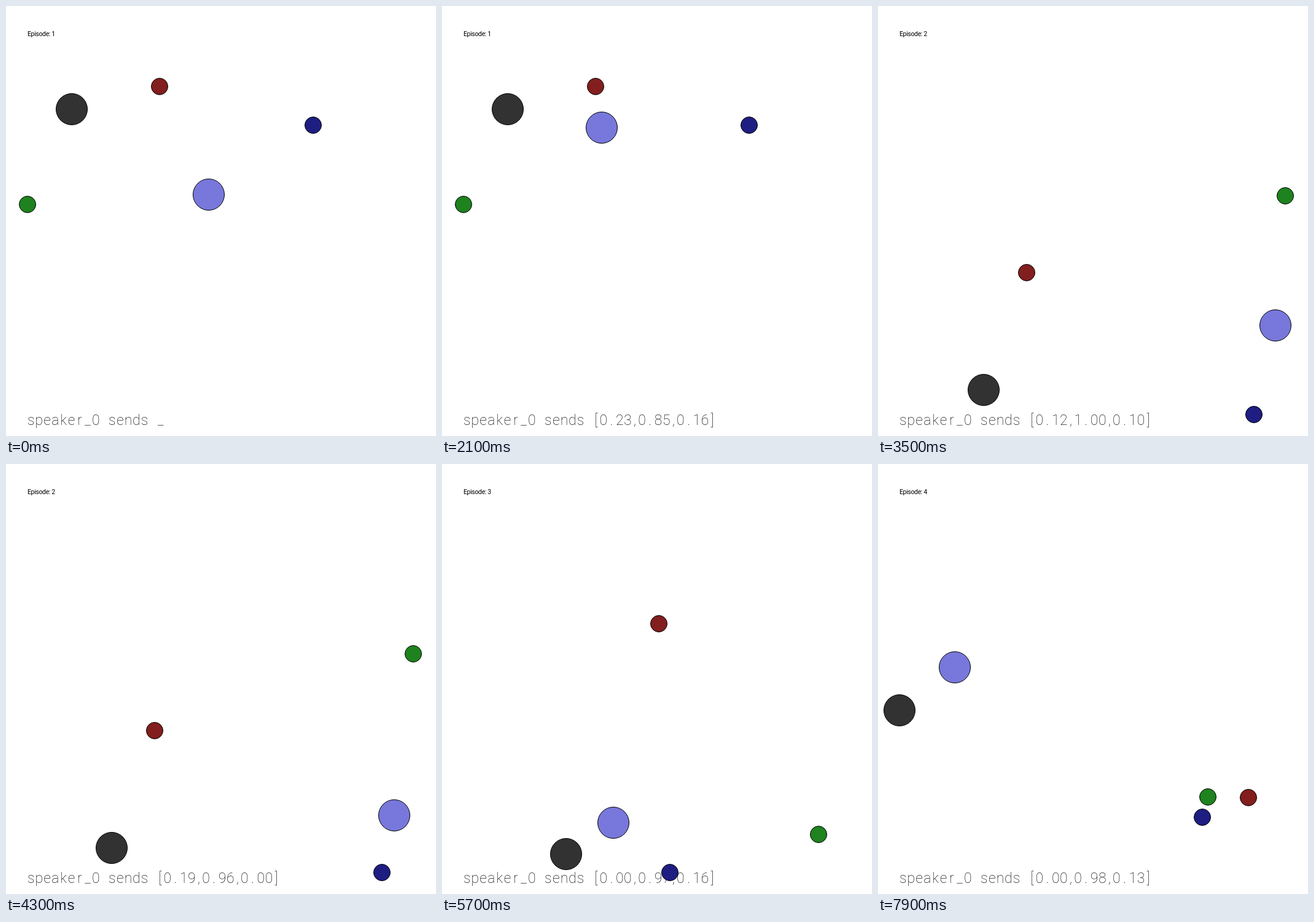
Recreate the animation shown at these times as an HTML page with a canvas. Size 700 by 700 pixels, loop 8 s.

```html
<!DOCTYPE html>
<html lang="en">
<head>
<meta charset="utf-8">
<title>Speaker and listener</title>
<style>
  html, body { margin: 0; width: 100%; height: 100%; overflow: hidden; background: #fff; }
  canvas { display: block; width: 700px; height: 700px; }
</style>
</head>
<body>
<canvas id="stage" width="700" height="700"></canvas>
<script>
const ctx = document.getElementById('stage').getContext('2d');
const LOOP = 8000, TICK = 100, STEPS = 25, TALK_SPAN = 12;
const LANDMARKS = ['rgb(130,30,30)', 'rgb(30,130,30)', 'rgb(30,30,130)'];

// The listener leaves the first point of its path, passes the second at step `via`
// and rests at the third. The speaker's messages vary around `talk`.
const episodes = [
  { speaker: [107, 168], spots: [[250, 131], [35, 323], [500, 194]],
    path: [[330, 307], [250, 203], [261, 198]], via: 9, talk: [[0, .9, .21], [.23, .85, .16]] },
  { speaker: [172, 625], spots: [[242, 434], [663, 309], [612, 665]],
    path: [[510, 151], [647, 520], [622, 585]], via: 10, talk: [[.12, 1, .1]] },
  { speaker: [202, 635], spots: [[353, 260], [613, 603], [371, 665]],
    path: [[44, 638], [516, 530], [520, 538]], via: 14, talk: [[.03, .91, .07]] },
  { speaker: [35, 401], spots: [[603, 543], [537, 542], [528, 575]],
    path: [[56, 302], [125, 331], [470, 480]], via: 4, talk: [[0, .98, .13]] }
];

// Cubic from p to q in h steps, with given end speeds
function ease(p, q, h, speedIn, speedOut, t) {
  const u = t / h, v = 1 - u;
  return p * v * v * (1 + 2 * u) + q * u * u * (3 - 2 * u) + h * u * v * (speedIn * v - speedOut * u);
}

function travel([from, mid, to], via, step) {
  const rest = STEPS - 1 - via;
  return [0, 1].map(k => {
    const a = (mid[k] - from[k]) / via, b = (to[k] - mid[k]) / rest;
    const speed = a * b > 0 ? 2 * a * b / (a + b) : 0;
    return Math.round(step < via
      ? ease(from[k], mid[k], via, 0, speed, step)
      : ease(mid[k], to[k], rest, speed, 0, step - via));
  });
}

function message({ talk, via }, step) {
  if (!step) return '_';
  const n = (step - via) % TALK_SPAN;
  const base = talk[Math.floor(step / TALK_SPAN) % talk.length];
  const values = base.map((value, k) => {
    const noisy = value + .1 * Math.sin(n * n * (k + 2));
    return Math.min(1, Math.max(0, noisy)).toFixed(2);
  });
  return '[' + values + ']';
}

function disc([x, y], r, color) {
  ctx.beginPath();
  ctx.arc(x, y, r - .5, 0, 7);
  ctx.fillStyle = color;
  ctx.fill();
  ctx.strokeStyle = '#000';
  ctx.stroke();
}

// Thin text on a nearly fixed pitch
function drawLine(text) {
  let x = 34;
  ctx.font = '100 23px Roboto, sans-serif';
  ctx.textAlign = 'center';
  ctx.fillStyle = '#000';
  for (const c of text) {
    const advance = '[]'.includes(c) ? 11 : c === ',' ? 10 : 13.2;
    ctx.fillText(c, x + advance / 2, 682);
    x += advance;
  }
}

function drawEpisode(n) {
  ctx.font = '10.5px Roboto, sans-serif';
  ctx.letterSpacing = '-0.35px';
  ctx.textAlign = 'left';
  ctx.fillStyle = '#000';
  ctx.fillText('Episode: ' + n, 35, 49);
  ctx.letterSpacing = '0px';
}

function draw(now) {
  const tick = Math.floor(now % LOOP / TICK);
  const index = Math.floor(tick / STEPS), step = tick % STEPS;
  const episode = episodes[index];

  ctx.fillStyle = '#fff';
  ctx.fillRect(0, 0, 700, 700);
  disc(episode.speaker, 26, 'rgb(50,50,50)');
  drawLine('speaker_0 sends ' + message(episode, step));
  disc(travel(episode.path, episode.via, step), 26, 'rgb(120,120,220)');
  episode.spots.forEach((spot, i) => disc(spot, 14, LANDMARKS[i]));
  drawEpisode(index + 1);
}

const start = performance.now();
function frame() {
  draw(performance.now() - start);
  requestAnimationFrame(frame);
}
frame();
</script>
</body>
</html>
```
